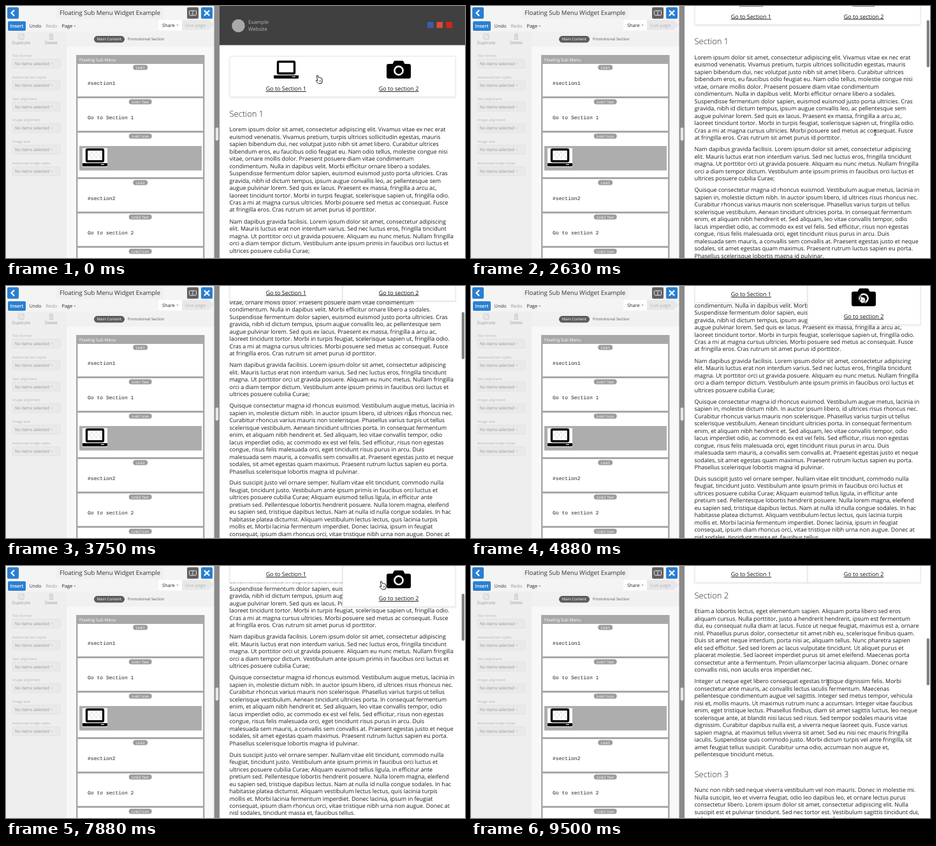
Animation, 720 px wide and 396 px high, one loop 9.63 s. Source, as an HTML page:

```html
<!DOCTYPE html>
<html lang="en">
<head>
<meta charset="utf-8">
<title>Floating Sub Menu Widget</title>
<style>
html, body { margin: 0; width: 100%; height: 100%; overflow: hidden; background: #fff; }
svg { display: block; width: 720px; height: 396px; }
text { font-family: "Open Sans", sans-serif; text-rendering: geometricPrecision; white-space: pre; }
.mono { font-family: "Liberation Mono", monospace; }
.light { font-weight: 300; }
.semi { font-weight: 600; }
.mid { text-anchor: middle; }
.link { text-anchor: middle; text-decoration: underline; }
</style>
</head>
<body>
<svg id="stage" viewBox="0 0 720 396"></svg>
<script>
const LOOP = 9630, STEP = 125;

// ---- drawing helpers (text is placed by the middle of its capitals) ----
const text = (s, x, y, size, fill = '#1a1a1a', cls = '') =>
  `<text x="${x}" y="${y + size * 0.357}" font-size="${size}" fill="${fill}" class="${cls}">${s}</text>`;
const rect = (x, y, w, h, fill, r = 0, extra = '') =>
  `<rect x="${x}" y="${y}" width="${w}" height="${h}" rx="${r}" fill="${fill}" ${extra}/>`;
const path = (d, fill = 'none', stroke = 'none', width = 1) =>
  `<path d="${d}" fill="${fill}" stroke="${stroke}" stroke-width="${width}"/>`;
const group = (id, body, extra = '') => `<g id="${id}" ${extra}>${body}</g>`;
const caret = (x, y, fill) => path(`M${x} ${y}h3l-1.5 1.6z`, fill);

const laptop = (x, y) =>
  rect(x + 6.5, y + 1.5, 26, 18.5, '#fff', 1.5, 'stroke="#000" stroke-width="3.4"') +
  path(`M${x} ${y + 23}h39v3.5q0 1.5-2 1.5h-35q-2 0-2-1.5z`, '#000') +
  rect(x + 29, y + 24.6, 5, 1.2, '#fff');
const camera = (x, y) =>
  path(`M${x + 3} ${y + 5}h6.5l2-4q.6-1 2-1h11q1.4 0 2 1l2 4h6.5q3 0 3 3v17q0 3-3 3h-32q-3 0-3-3v-17q0-3 3-3z`, '#000') +
  `<circle cx="${x + 19}" cy="${y + 15.5}" r="6.6" fill="#000" stroke="#fff" stroke-width="2.6"/>`;

// ---- editor on the left ----
function editor() {
  const blue = '#2b7fd0', grey = '#a8a8a8';
  let s = rect(0, 0, 327, 396, '#f8f8f8') + rect(0, 0, 327, 40, '#f4f4f4') +
    rect(0, 40, 95, 356, '#eeeeee') + rect(95, 40, 232, 24, '#f1f1f1') +
    rect(79, 2, 168, 18, '#efefef', 2) +
    text('Floating Sub Menu Widget Example', 163.2, 10.5, 9.6, '#333', 'mid') +
    rect(2, 2, 18, 18, blue, 2) + path('M13 6.5l-4.5 4.5 4.5 4.5', 'none', '#fff', 2.2) +
    rect(284, 2, 18, 18, '#636363', 2) + rect(287.5, 7.5, 11, 7, 'none', 1, 'stroke="#ddd"') +
    path('M293 7.5v7', 'none', '#ddd') +
    rect(306, 2, 18, 18, blue, 2) + path('M311 7l8 8m0-8l-8 8', 'none', '#fff', 2.4);

  s += rect(3, 24, 28, 15, blue, 2) + text('Insert', 17, 31, 7.4, '#fff', 'mid semi') +
    text('Undo', 36.5, 31, 7.4, '#333') + text('Redo', 62.5, 31, 7.4, '#999') +
    text('Page', 87.5, 31, 7.4, '#222') + caret(106.5, 30.8, '#777') +
    path('M276 22h42l8 8-8 8h-42z', '#e8e8e8') + text('Live page', 281, 30, 7.4, '#b5b5b5') +
    rect(239, 22, 37, 16, '#fff', 2) + text('Share', 245, 30, 7.4, '#222') + caret(267.5, 29.6, '#777');

  s += rect(20, 44, 8, 8, 'none', 1, 'stroke="#c6c6c6"') + path('M22 50l5-5', 'none', '#c6c6c6') +
    path('M67.5 45h7m-5-1.5h3m-4 3v6h5v-6zm1.7 1v4m1.7-4v4', 'none', '#c6c6c6', 0.9) +
    text('Duplicate', 9.5, 58, 6.5, '#999') + text('Delete', 61, 58, 6.5, '#999');
  ['Text format', 'Advanced text styles', 'Text alignment', 'Image alignment', 'Image size', 'Advanced image styles']
    .forEach((label, i) => {
      const y = 78 + i * 33.8;
      s += text(label, 10, y, 5.65, '#b4b4b4') +
        rect(10, y + 5.5, 75, 14, '#e9e9e9', 1.5, 'stroke="#dedede" stroke-width=".7"') +
        text('No items selected', 14, y + 12.6, 6.5, '#929292') + caret(70.5, y + 12, '#bbb');
    });

  s += rect(138, 47, 48, 10.6, '#5c5c5c', 5.3) + text('Main Content', 162, 52.2, 6.1, '#fff', 'mid') +
    text('Promotional Section', 191, 52.2, 6.1, '#555') +
    rect(110, 77, 201.5, 319, grey) + text('Floating Sub Menu', 115, 84.5, 6.6, '#fff');
  [['Link1', 91, '#section1'], ['Link1 Text', 145, 'Go to Section 1'], ['Link1 Icon', 199],
   ['Link2', 272, '#section2'], ['Link2 Text', 326, 'Go to section 2'], ['Link2 Icon', 380]]
    .forEach(([label, y, value]) => {
      const w = label.length > 5 ? 36 : 23;
      s += rect(112.5, y, 196.5, value ? 51 : 70, '#fff') +
        rect(210.7 - w / 2, y + 1.5, w, 8, '#9c9c9c', 4) + text(label, 210.7, y + 5.6, 5.8, '#fff', 'mid');
      if (value) s += text(value, 128, y + 30.5, 8.05, '#222', 'mono');
    });
  s += rect(115, 220, 192, 38.5, '#adadad') + rect(120, 223.5, 39, 29.5, '#fff') + laptop(120, 224);
  for (let i = 0; i < 18; i++)
    if ((i + (i / 6 | 0)) % 2) s += rect(129 + i % 6 * 3.6, 228 + (i / 6 | 0) * 4, 3.6, 4, '#ededed');
  return s + rect(326.5, 0, 8.5, 396, '#8a8a8a') + rect(328.7, 191, 4.6, 20.5, '#e6e6e6', 2);
}

// ---- web page on the right ----
const items = [
  laptop(420, 7) + text('Go to Section 1', 439.3, 50.8, 8.97, '#111', 'link'),
  camera(597, 7) + text('Go to section 2', 616, 50.8, 8.97, '#111', 'link')
];
const paragraphs = [
[194, `Lorem ipsum dolor sit amet, consectetur adipiscing elit. Vivamus vitae ex nec erat
euismod venenatis. Vivamus pretium, turpis ultrices sollicitudin egestas, mauris
sapien bibendum dui, nec volutpat justo nibh sit amet libero. Curabitur ultrices
bibendum eros, eu faucibus odio feugiat eu. Nam odio tellus, molestie congue nisi
vitae, ornare mollis dolor. Praesent posuere diam vitae condimentum
condimentum. Nulla in dapibus velit. Morbi efficitur ornare libero a sodales.
Suspendisse fermentum dolor sapien, euismod euismod justo porta ultricies. Cras
gravida, nibh id dictum tempus, ipsum augue convallis leo, ac pellentesque sem
augue pulvinar lorem. Sed quis ex lacus. Praesent ex massa, fringilla a arcu ac,
laoreet tincidunt tortor. Morbi in turpis feugiat, scelerisque sapien ut, fringilla odio.
Cras a mi at magna cursus ultricies. Morbi posuere sed metus ac consequat. Fusce
at fringilla eros. Cras rutrum sit amet purus id porttitor.`],
[338.5, `Nam dapibus gravida facilisis. Lorem ipsum dolor sit amet, consectetur adipiscing
elit. Mauris luctus erat non interdum varius. Sed nec luctus eros, fringilla tincidunt
magna. Ut porttitor orci ut gravida posuere. Aliquam eu nunc metus. Nullam fringilla
orci a diam tempor dictum. Vestibulum ante ipsum primis in faucibus orci luctus et
ultrices posuere cubilia Curae;`],
[402.5, `Quisque consectetur magna id rhoncus euismod. Vestibulum augue metus, lacinia in
sapien in, molestie dictum nibh. In auctor ipsum libero, id ultrices risus rhoncus nec.
Curabitur rhoncus varius mauris non scelerisque. Phasellus varius turpis ut tellus
scelerisque vestibulum. Aenean tincidunt ultricies porta. In consequat fermentum
enim, et aliquam nibh hendrerit et. Sed aliquam, leo vitae convallis tempor, odio
lacus imperdiet odio, ac commodo ex est vel felis. Sed efficitur, risus non egestas
congue, risus felis malesuada orci, eget tincidunt risus purus in arcu. Duis
malesuada sem mauris, a convallis sem convallis at. Praesent egestas justo et neque
sodales, sit amet egestas quam maximus. Praesent rutrum luctus sapien eu porta.
Phasellus scelerisque lobortis magna id pulvinar.`],
[523.7, `Duis suscipit justo vel ornare semper. Nullam vitae elit tincidunt, commodo nulla
feugiat, tincidunt justo. Vestibulum ante ipsum primis in faucibus orci luctus et
ultrices posuere cubilia Curae; Aliquam euismod tellus ligula, in efficitur ante
pretium sed. Pellentesque lobortis hendrerit posuere. Nulla lorem magna, eleifend
eu sapien sed, tristique dapibus lectus. Nam at nulla id nulla congue sodales. In hac
habitasse platea dictumst. Aliquam vestibulum lectus lectus, quis lacinia turpis
mollis et. Morbi lacinia fermentum imperdiet. Donec lacinia, ipsum in feugiat
consequat, ipsum diam rhoncus orci, vitae tristique nibh urna non augue. Donec at
nisl sodales, tincidunt massa et, faucibus tellus.`],
[672, `Etiam a lobortis lectus, eget elementum sapien. Aliquam porta libero sed eros
aliquam cursus. Nulla porttitor, justo a hendrerit hendrerit, ipsum est fermentum
dui, eu consequat nulla diam at lacus. Fusce ut neque feugiat, maximus est a, ornare
nisl. Phasellus purus dolor, consectetur sit amet nibh eu, scelerisque finibus quam.
Duis sit amet neque interdum, porta nisi ac, aliquam tellus. Nunc pharetra sapien
elit sed efficitur. Sed sed lorem ac lacus vulputate tincidunt. Ut aliquet purus et
placerat molestie. Sed laoreet imperdiet purus sit amet eleifend. Maecenas porta
consectetur ante a fermentum. Proin ullamcorper lacinia aliquam. Donec ornare
convallis nisi, non iaculis eros imperdiet nec.`],
[782, `Integer ut neque eget libero consequat egestas tristique dignissim felis. Morbi
consectetur ante mauris, ac convallis lectus iaculis fermentum. Maecenas
pellentesque condimentum augue vel sagittis. Integer sed metus tempor, vehicula
nisi et, mollis mauris. Ut maximus rutrum nunc a accumsan. Integer vitae faucibus
enim, eget tristique lectus. Phasellus finibus, diam sit amet sagittis luctus, leo neque
scelerisque ante, at blandit nisi lacus sed risus. Sed tempor sodales mauris vitae
dignissim. Curabitur dapibus nulla est, a viverra neque laoreet quis. Fusce varius
sapien magna, at maximus tellus viverra sit amet. Sed eu nisi nec mauris fringilla
iaculis. Suspendisse quis commodo justo. Morbi dictum turpis vel ante fringilla, sit
amet feugiat tellus suscipit. Curabitur urna odio, accumsan non augue et,
pellentesque tincidunt metus.`],
[953, `Nunc non nibh sed neque viverra vestibulum vel non mauris. Donec in molestie mi.
Nulla suscipit, leo et viverra feugiat, odio leo dapibus leo, et ornare lectus purus
consectetur libero. Lorem ipsum dolor sit amet, consectetur adipiscing elit. Nulla
suscipit est et pulvinar tincidunt. Sed nec tortor est. Vestibulum sagittis tincidunt dui,
at luctus sapien porta vitae. Integer a sem nec justo feugiat tempor.`]
];

function page() {
  const border = 'stroke="#e2e2e2" filter="url(#soft)"';
  let s = rect(335, 0, 385, 61.5, '#404040') + '<circle cx="364.5" cy="31" r="10.3" fill="#a9a9a9"/>' +
    text('Example', 380, 25.5, 8, '#b5b5b5') + text('Website', 380, 36.2, 8, '#b5b5b5') +
    rect(661, 25, 9.5, 9.5, '#3b5fa5') + rect(675.5, 25, 9.5, 9.5, '#dd4b39') + rect(690.5, 25, 9.5, 9.5, '#d8201f') +
    group('menu', rect(351, 0, 354, 64, '#fff', 2, border) + items.join(''), 'transform="translate(0 79)"');
  [169, 647, 928].forEach((y, i) => s += text('Section ' + (i + 1), 350.5, y, 13, '#222', 'light'));
  for (const [y, body] of paragraphs)
    body.split('\n').forEach((line, i) => s += text(line, 350.5, y + i * 11.48, 8.97));
  const floating = items.map((body, i) =>
    group('item' + i, rect(351 + i * 177, 0, 177, 64, '#fff', 0, border) + body)).join('');
  return group('page', s) + group('floating', floating);
}

const cursors =
  group('hand', path('M-3.6-5.6q.9-1.2 1.9 0l1.3 3.2q1-.8 1.7.2q1-.6 1.7.4q1.2-.3 1.6 1l.6 3.2-.6 3.6-5 1.2-4.2-4.2q-.6-1.5 1.3-1.1l1 .6z', '#fff', '#111', 1) +
    path('M.6 1.6l.5 2.8m1.2-3.1l.5 2.8', 'none', '#111', 0.6)) +
  group('beam', path('M-2-4.3q2 0 2 1.2v6.2q0 1.2-2 1.2m4-8.6q-2 0-2 1.2m0 6.2q0 1.2 2 1.2', 'none', '#333', 0.9));

document.getElementById('stage').innerHTML =
  '<defs><filter id="soft" x="-5%" y="-10%" width="110%" height="125%">' +
  '<feDropShadow dx="0" dy="1" stdDeviation="1" flood-opacity=".1"/></filter></defs>' +
  rect(0, 0, 720, 396, '#fff') + page() +
  rect(714.8, 0, 4.2, 74, '#808080', 2, 'id="thumb"') + editor() + cursors;

// ---- motion ----
const clamp = v => Math.max(0, Math.min(1, v));
const swing = p => (1 - Math.cos(Math.PI * clamp(p))) / 2;
const easeOut = p => 1 - (1 - clamp(p)) ** 2;

function track(keys, t, ease = clamp, col = 1) {
  const i = keys.findIndex(k => k[0] > t);
  if (i < 0) return keys[keys.length - 1][col];
  if (!i) return keys[0][col];
  const a = keys[i - 1], b = keys[i];
  return a[col] + (b[col] - a[col]) * ease((t - a[0]) / (b[0] - a[0]));
}

const wheel = [[1375, 0], [1500, 14], [1750, 54.5], [2000, 90], [2250, 105], [2375, 105],
  [2625, 113.5], [2750, 125], [3000, 155], [3375, 184], [3625, 208], [3875, 221]];
const pointer = [[375, 491, 115], [1250, 634, 199], [4000, 634, 199], [4750, 614, 20], [5000, 613, 20],
  [6125, 440, 32], [6375, 440, 32], [7250, 597, 28], [7500, 597, 28], [7875, 591, 30], [8875, 591, 30], [9500, 560, 183]];
const opening = [
  [[5650, 0], [6200, 1], [6750, 1], [7250, 0]],
  [[4520, 0], [5020, 1], [5650, 1], [6200, 0], [6750, 0], [7250, 1], [8950, 1], [9450, 0]]
];
const thumbFade = [[1375, 0], [1500, 1], [4125, 1], [4625, 0], [7750, 0], [7875, 1]];

const el = id => document.getElementById(id);
const move = (id, x, y) => el(id).setAttribute('transform', `translate(${x} ${y})`);

function render(t) {
  const scroll = track(wheel, t) + 380 * swing((t - 7785) / 1100);
  move('page', 0, -scroll);
  move('floating', 0, track([[3375, -40], [3875, 0]], t, easeOut));
  opening.forEach((keys, i) => move('item' + i, 0, -38 * (1 - track(keys, t, easeOut))));

  el('thumb').setAttribute('y', 1 + scroll * 0.187);
  el('thumb').setAttribute('opacity', track(thumbFade, t));

  const x = track(pointer, t, swing, 1), y = track(pointer, t, swing, 2);
  const overLink = y < (t < 1375 ? 143 : 64);
  move('hand', x, y);
  move('beam', x, y);
  el('hand').setAttribute('visibility', overLink ? 'visible' : 'hidden');
  el('beam').setAttribute('visibility', overLink ? 'hidden' : 'visible');
}

function tick() {
  const t = performance.now() % LOOP;
  render(Math.floor((t + 5) / STEP) * STEP);
  requestAnimationFrame(tick);
}
tick();
</script>
</body>
</html>
```
